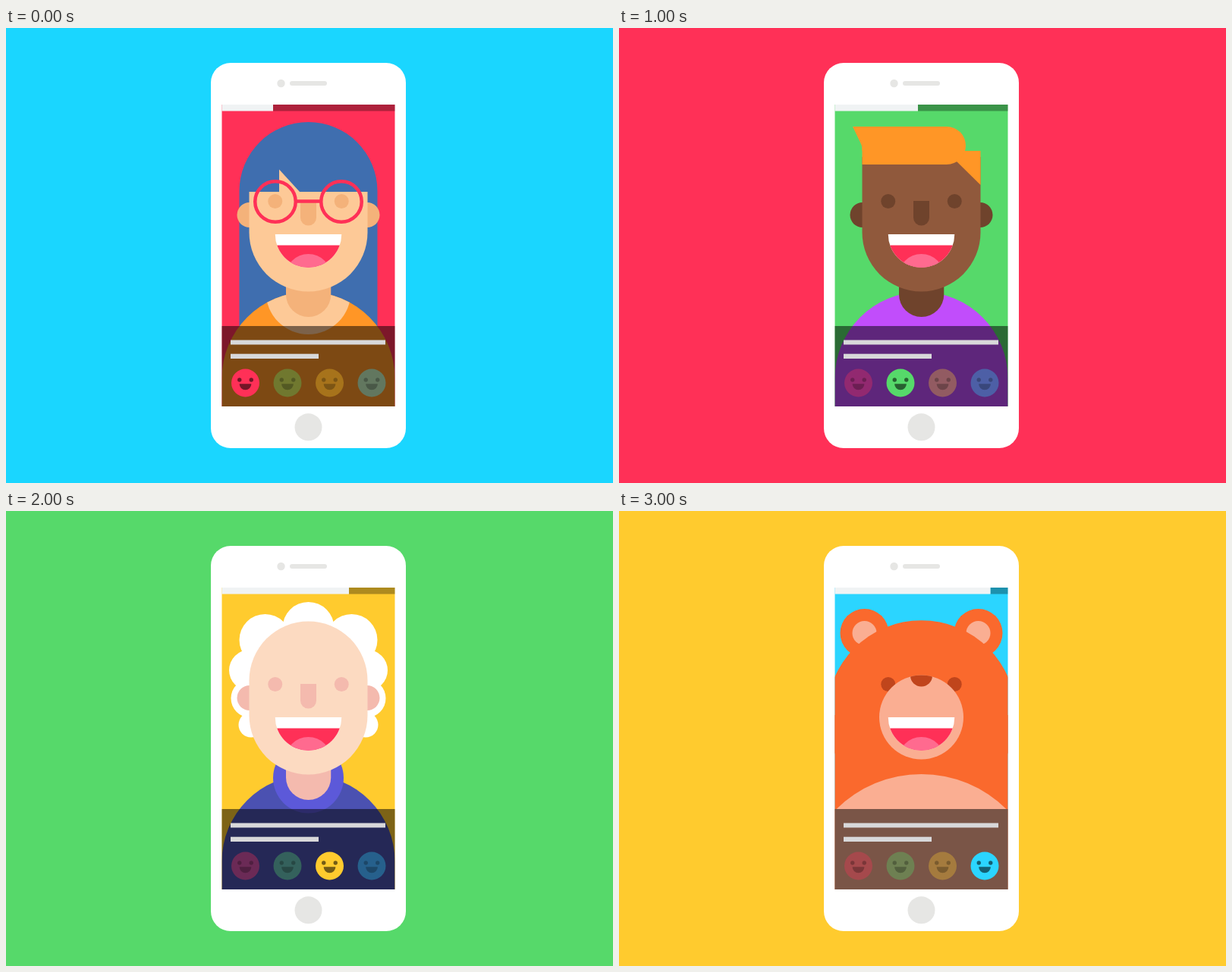
Recreate the animation shown at these times as an HTML page with a canvas. Size 800 px wide and 600 px high, loop 4000 ms.

```html
<!DOCTYPE html>
<html lang="en">
<head>
<meta charset="utf-8">
<title>Phone portraits</title>
<style>
  html, body { margin: 0; width: 100%; height: 100%; overflow: hidden; }
  canvas { display: block; width: 800px; height: 600px; }
</style>
</head>
<body>
<canvas id="stage" width="800" height="600"></canvas>
<script>
const ctx = document.getElementById('stage').getContext('2d');
const CX = 398.5;
const RED = '#ff3057', GREEN = '#56d96a', YELLOW = '#ffcb2e', BLUE = '#2bd5ff';
const ORANGE = '#ff9626', WHITE = '#fff', GREY = '#e6e6e4';
const MOODS = [RED, GREEN, YELLOW, BLUE];
const HOLD = 1000;

function rect(x0, y0, x1, y1, color) {
  ctx.fillStyle = color;
  ctx.fillRect(x0, y0, x1 - x0, y1 - y0);
}

function round(x0, y0, x1, y1, radii, color) {
  ctx.fillStyle = color;
  ctx.beginPath();
  ctx.roundRect(x0, y0, x1 - x0, y1 - y0, radii);
  ctx.fill();
}

function disc(x, y, r, color) {
  ctx.fillStyle = color;
  ctx.beginPath();
  ctx.arc(x, y, r, 0, Math.PI * 2);
  ctx.fill();
}

function bowl(x, y, r, color) {
  ctx.fillStyle = color;
  ctx.beginPath();
  ctx.arc(x, y, r, 0, Math.PI);
  ctx.fill();
}

function poly(points, color) {
  ctx.fillStyle = color;
  ctx.beginPath();
  points.forEach(([x, y]) => ctx.lineTo(x, y));
  ctx.fill();
}

// Mirrored pair of discs around the centre line
function pair(dx, y, r, color) {
  disc(CX - dx, y, r, color);
  disc(CX + dx, y, r, color);
}

function clipped(path, draw) {
  ctx.save();
  ctx.beginPath();
  path();
  ctx.clip();
  draw();
  ctx.restore();
}

function mouth() {
  bowl(CX, 272, 43.75, WHITE);
  clipped(() => ctx.arc(CX, 272, 43.75, 0, Math.PI), () => {
    rect(350, 286.5, 450, 320, RED);
    disc(CX, 328.5, 30.5, '#ff6a8f');
  });
}

const eyes = color => pair(43.75, 228.5, 9.5, color);
const ears = color => pair(77.5, 246.5, 16.5, color);
const neck = color => round(369, 310, 428.25, 381, [0, 0, 29.6, 29.6], color);
const head = (top, topR, color) =>
  round(320.5, top, 476.5, 347.5, [topR, topR, 78, 78], color);
const torsoPath = () => ctx.roundRect(284.5, 348, 228, 160, [114, 114, 0, 0]);

function torso(color) {
  ctx.fillStyle = color;
  ctx.beginPath();
  torsoPath();
  ctx.fill();
}

function features(shade) {
  eyes(shade);
  round(388, 228, 409, 260.5, [0, 0, 10.5, 10.5], shade);
  mouth();
}

function woman() {
  const skin = '#fdc997', shade = '#f4b27a', hair = '#3f6eaf';
  round(307.5, 124, 489.5, 480, [91, 91, 0, 0], hair);
  torso(ORANGE);
  clipped(torsoPath, () => disc(CX, 348, 56, skin));
  neck(shade);
  ears(shade);
  head(180, 0, skin);
  rect(320, 179, 477, 216, hair);
  poly([[360, 186.5], [387, 216], [360, 216]], skin);
  features(shade);
  ctx.strokeStyle = RED;
  ctx.lineWidth = 4.5;
  ctx.beginPath();
  ctx.arc(355, 229, 26.75, 0, Math.PI * 2);
  ctx.moveTo(468.75, 229);
  ctx.arc(442, 229, 26.75, 0, Math.PI * 2);
  ctx.moveTo(382, 228.5);
  ctx.lineTo(415, 228.5);
  ctx.stroke();
}

function man() {
  const skin = '#90593c', shade = '#6f432c';
  torso('#c14dfb');
  neck(shade);
  ears(shade);
  head(170, 0, skin);
  poly([[444, 162], [476.5, 162], [476.5, 207], [444, 175]], ORANGE);
  round(320.5, 130, 457, 180, [0, 25, 25, 0], ORANGE);
  ctx.beginPath();
  ctx.moveTo(308, 130);
  ctx.lineTo(319, 153);
  ctx.quadraticCurveTo(320.5, 156, 320.5, 162);
  ctx.lineTo(322, 162);
  ctx.lineTo(322, 130);
  ctx.fill();
  features(shade);
}

function elder() {
  const skin = '#fcdac1', shade = '#f4baae';
  disc(CX, 154, 34, WHITE);
  [[55, 170, 34], [77.5, 210, 27], [76.5, 247, 25.5], [75.5, 282, 16.5]]
    .forEach(([dx, y, r]) => pair(dx + (r === 34 ? 2 : 0), y, r, WHITE));
  torso('#4b51b1');
  disc(CX, 352, 46.5, '#5c59d9');
  neck(shade);
  ears(shade);
  head(145.5, 78, skin);
  features(shade);
}

function bear() {
  const fur = '#fa692d', pale = '#faae92', shade = '#c0451c';
  pair(75, 161, 32, fur);
  pair(75, 161, 16, pale);
  disc(CX, 269, 124.8, fur);
  rect(284, 269, 513, 499, fur);
  disc(CX, 506, 159, pale);
  rect(284, 393, 513, 499, pale);
  eyes(shade);
  disc(CX, 272, 55.5, pale);
  clipped(() => ctx.arc(CX, 272, 55.5, 0, Math.PI * 2),
    () => disc(CX, 217, 14.5, shade));
  mouth();
}

function smiley(x, color, active) {
  ctx.globalAlpha = active ? 1 : 0.32;
  disc(x, 468, 18.5, color);
  ctx.globalAlpha = active ? 0.55 : 0.26;
  disc(x - 7.75, 464, 2.7, '#000');
  disc(x + 7.75, 464, 2.7, '#000');
  bowl(x, 469.3, 7.9, '#000');
  ctx.globalAlpha = 1;
}

const scenes = [
  { back: '#1ad6ff', portrait: woman, progress: 352 },
  { back: RED, portrait: man, progress: 394 },
  { back: GREEN, portrait: elder, progress: 452 },
  { back: YELLOW, portrait: bear, progress: 489.5 }
];

function draw(index) {
  const { back, portrait, progress } = scenes[index];
  rect(0, 0, 800, 600, back);
  round(270, 46, 527, 554, 26, WHITE);
  disc(362.5, 73, 5.2, GREY);
  round(374, 70, 423, 76, 3, GREY);
  disc(CX, 526.3, 18, GREY);

  clipped(() => ctx.rect(284.5, 101, 228, 398), () => {
    rect(284, 101, 513, 499, MOODS[index]);
    portrait();
    rect(progress, 101, 513, 109.5, 'rgba(0,0,0,.32)');
    rect(284, 101, progress, 109.5, '#f0f3f4');
    rect(284, 393, 513, 499, 'rgba(0,0,0,.51)');
    rect(296, 411.5, 500, 417.5, '#d8d8da');
    rect(296, 429.7, 412, 436, '#d8d8da');
    MOODS.forEach((color, i) => smiley(315.5 + i * 55.5, color, i === index));
  });
}

const start = performance.now();
let shown = -1;

function tick() {
  const index = Math.floor((performance.now() - start) / HOLD) % scenes.length;
  if (index !== shown) draw(shown = index);
  requestAnimationFrame(tick);
}
tick();
</script>
</body>
</html>
```
